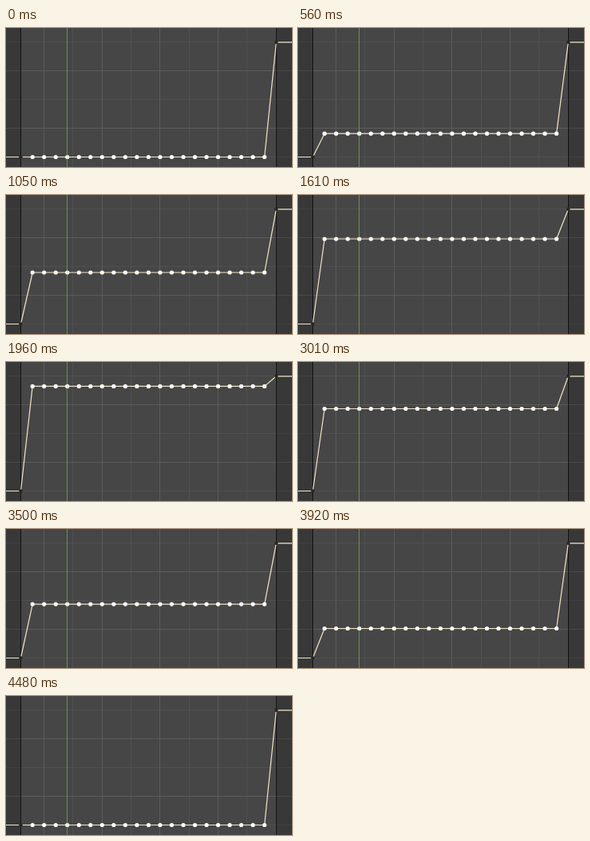
Animation of 358x174 px, one loop 4550 ms. Source, as an HTML page with a canvas:

```html
<!DOCTYPE html>
<html lang="en">
<head>
<meta charset="utf-8">
<title>Keyframe curve</title>
<style>
html, body { margin: 0; width: 100%; height: 100%; overflow: hidden; background: #464646; }
canvas { display: block; }
</style>
</head>
<body>
<canvas id="stage" width="358" height="174"></canvas>
<script>
const ctx = document.getElementById('stage').getContext('2d');
const W = 358, H = 174, LOOP = 4550, STEP = 70;
const LEFT = 18.5, RIGHT = 338.3, LOW = 161.5, HIGH = 17.8;
const FIRST = 33.2, GAP = 14.52, COUNT = 21;

// time, height and speed of the dragged row
const keys = [
  [0, LOW, 0], [70, 161, -0.045], [1050, 97, -0.071], [1610, 55, -0.071],
  [2170, 17.5, -0.055], [2380, 17.5, 0.045], [2450, 21, 0.06],
  [3010, 58.5, 0.07], [3920, 124.5, 0.07], [4480, LOW, 0.055], [LOOP, LOW, 0]
];

function rowY(t) {
  let i = 0;
  while (i < keys.length - 2 && t >= keys[i + 1][0]) i++;
  const [t0, y0, v0] = keys[i], [t1, y1, v1] = keys[i + 1];
  if (y0 === y1) return y0;
  const d = t1 - t0, u = (t - t0) / d, w = 1 - u;
  return y0 * (1 + 2 * u) * w * w + v0 * d * u * w * w
       + y1 * u * u * (3 - 2 * u) - v1 * d * u * u * w;
}

function rect(x, y, w, h, color) {
  ctx.fillStyle = color;
  ctx.fillRect(x, y, w, h);
}

function dot(x, y, r, color) {
  ctx.fillStyle = color;
  ctx.beginPath();
  ctx.arc(x, y, r, 0, Math.PI * 2);
  ctx.fill();
}

function grid() {
  rect(0, 0, W, H, '#464646');
  for (let i = 0; i < 9; i++) {
    rect(Math.floor(11.5 + 36.3 * i), 0, 1, H, i % 2 ? '#5b5b5b' : '#505050');
  }
  for (let i = 0; i < 5; i++) {
    rect(0, Math.floor(17.3 + 36 * i), W, 1, i % 2 ? '#5b5b5b' : '#505050');
  }
}

function draw(t) {
  const y = rowY(t), last = FIRST + GAP * (COUNT - 1);
  ctx.clearRect(0, 0, W, H);
  // grid lines are spaced from x = 47
  rect(0, 0, W, H, '#464646');
  const lines = [['#505050', 1], ['#5b5b5b', 0]];
  for (const [color, odd] of lines) {
    for (let i = odd; i < 9; i += 2) rect(Math.floor(47.6 + 36.3 * i), 0, 1, H, color);
    for (let i = 1 - odd; i < 5; i += 2) rect(0, Math.floor(17.3 + 36 * i), W, 1, color);
  }
  rect(0, 0, 18, H, 'rgba(0,0,0,0.2)');
  rect(339, 0, 19, H, 'rgba(0,0,0,0.2)');
  rect(18, 0, 1, H, '#111');
  rect(338, 0, 1, H, '#111');
  rect(76, 0, 1, H, '#6c9052');

  ctx.strokeStyle = '#f3e6c8';
  ctx.lineWidth = 1.2;
  ctx.lineJoin = 'round';
  ctx.beginPath();
  ctx.moveTo(0, LOW);
  ctx.lineTo(LEFT, LOW);
  ctx.lineTo(FIRST, y);
  ctx.lineTo(last, y);
  ctx.lineTo(RIGHT, HIGH);
  ctx.lineTo(W, HIGH);
  ctx.stroke();

  dot(LEFT, LOW, 2.2, '#2a2622');
  dot(RIGHT, HIGH, 2.2, '#2a2622');
  for (let i = 0; i < COUNT; i++) dot(FIRST + GAP * i, y, 2.6, '#fff');
  rect(76, 0, 1, H, 'rgba(108,144,82,0.35)');
}

const start = performance.now();
function frame() {
  const t = Math.max(0, performance.now() - start) % LOOP;
  draw(Math.floor(t / STEP) * STEP);
  requestAnimationFrame(frame);
}
frame();
</script>
</body>
</html>
```
